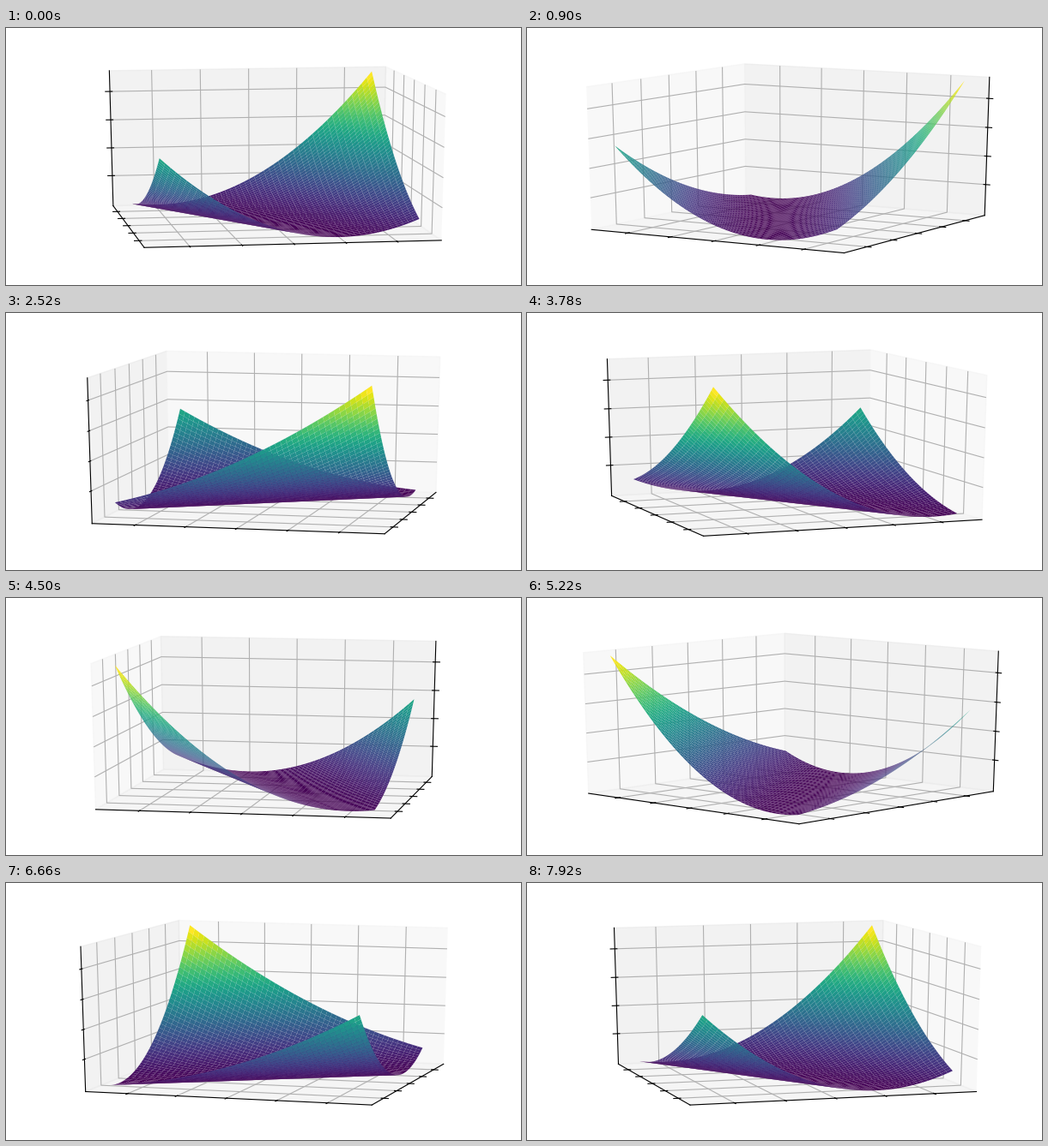
Recreate the animation shown at these times as a matplotlib script. Size 600 px wide and 300 px high, loop 8100 ms.

```python
import matplotlib.pyplot as plt
import numpy as np
from matplotlib.animation import FuncAnimation
from mpl_toolkits.mplot3d import Axes3D

FRAMES, INTERVAL = 45, 180
ELEV, START_AZIM = 14, -99
TOP = 46.3


class WideAxes(Axes3D):
    """3D axes that fill their rectangle instead of staying square."""

    def apply_aspect(self, position=None):
        pass


def padded(low, high):
    pad = (high - low) / 48
    return low - pad, high + pad


fig = plt.figure(figsize=(6, 3), dpi=100, facecolor="white")
ax = WideAxes(fig, [0, 0, 1, 1])
fig.add_axes(ax)

# Squared error of a linear model: a valley with a flat floor line.
side = np.linspace(-5, 5, 50)
x, y = np.meshgrid(side, side)
z = (0.758 * x + 0.446 * y + 0.7825) ** 2
ax.plot_surface(x, y, z, cmap="viridis", linewidth=0)

ticks = [-4, -2, 0, 2, 4]
ax.set_xticks(ticks)
ax.set_yticks(ticks)
ax.set_zticks([10, 20, 30, 40])
for axis in (ax.xaxis, ax.yaxis, ax.zaxis):
    axis.set_ticklabels([])

ax.set_xlim(*padded(-5.5, 5.5))
ax.set_ylim(*padded(-5.5, 5.5))
ax.set_zlim(*padded(0, TOP))
# Zoom chosen so that the unpadded cube has sides of one unit.
ax.set_box_aspect((1, 1, 1), zoom=np.sqrt(3) / 1.82946)


def update(i):
    ax.view_init(elev=ELEV, azim=START_AZIM + i * 360 / FRAMES)
    return []


anim = FuncAnimation(fig, update, frames=FRAMES, interval=INTERVAL,
                     init_func=lambda: update(0), repeat=True, repeat_delay=0)
plt.show()
```
